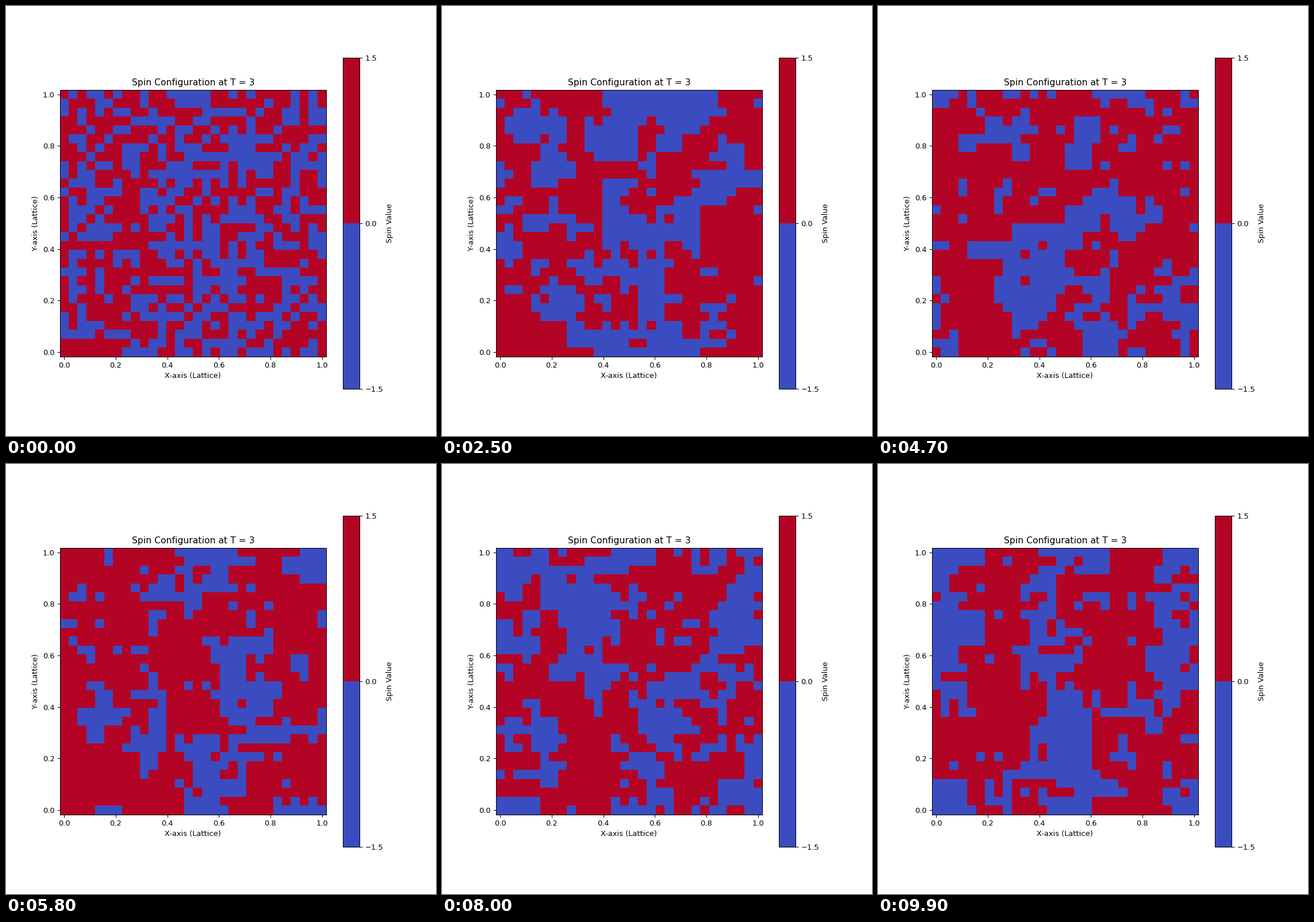
Write a matplotlib script that moves like this. It is 748 px wide and 748 px high and loops after 10000 ms.

```python
import numpy as np
import matplotlib.pyplot as plt
from matplotlib.animation import FuncAnimation
from matplotlib.colors import BoundaryNorm

N = 30              # lattice sites per side
FRAMES = 100
TEMP = 3
COUPLING = 1.12     # neighbour bond strength
FIELD = 0.015       # faint pull towards spin up


def sweep(spins, rng):
    """One Metropolis sweep with periodic edges."""
    sites = rng.integers(0, N, (N * N, 2))
    chances = rng.random(N * N)
    for (i, j), p in zip(sites, chances):
        near = (spins[i - 1, j] + spins[(i + 1) % N, j]
                + spins[i, j - 1] + spins[i, (j + 1) % N])
        cost = 2 * spins[i, j] * (COUPLING * near + FIELD)
        if cost <= 0 or p < np.exp(-cost / TEMP):
            spins[i, j] *= -1


def simulate(seed=7):
    rng = np.random.default_rng(seed)
    spins = rng.choice([-1, 1], (N, N))
    states = [spins.copy()]
    for _ in range(FRAMES - 1):
        sweep(spins, rng)
        states.append(spins.copy())
    return states


states = simulate()

plt.rcParams["font.family"] = "DejaVu Sans"
fig, ax = plt.subplots(figsize=(8, 8), dpi=93.5)
grid = np.linspace(0, 1, N)
levels = [-1.5, 0, 1.5]
mesh = ax.pcolormesh(grid, grid, states[0], shading="nearest",
                     cmap=plt.get_cmap("coolwarm", 2),
                     norm=BoundaryNorm(levels, 2))
ax.set_aspect("equal")
ax.set_title(f"Spin Configuration at T = {TEMP}")
ax.set_xlabel("X-axis (Lattice)")
ax.set_ylabel("Y-axis (Lattice)")
fig.colorbar(mesh, ax=ax, ticks=levels, label="Spin Value")


def update(frame):
    mesh.set_array(states[frame])
    return [mesh]


anim = FuncAnimation(fig, update, frames=FRAMES, interval=100,
                     repeat=True, repeat_delay=0)
plt.show()
```
